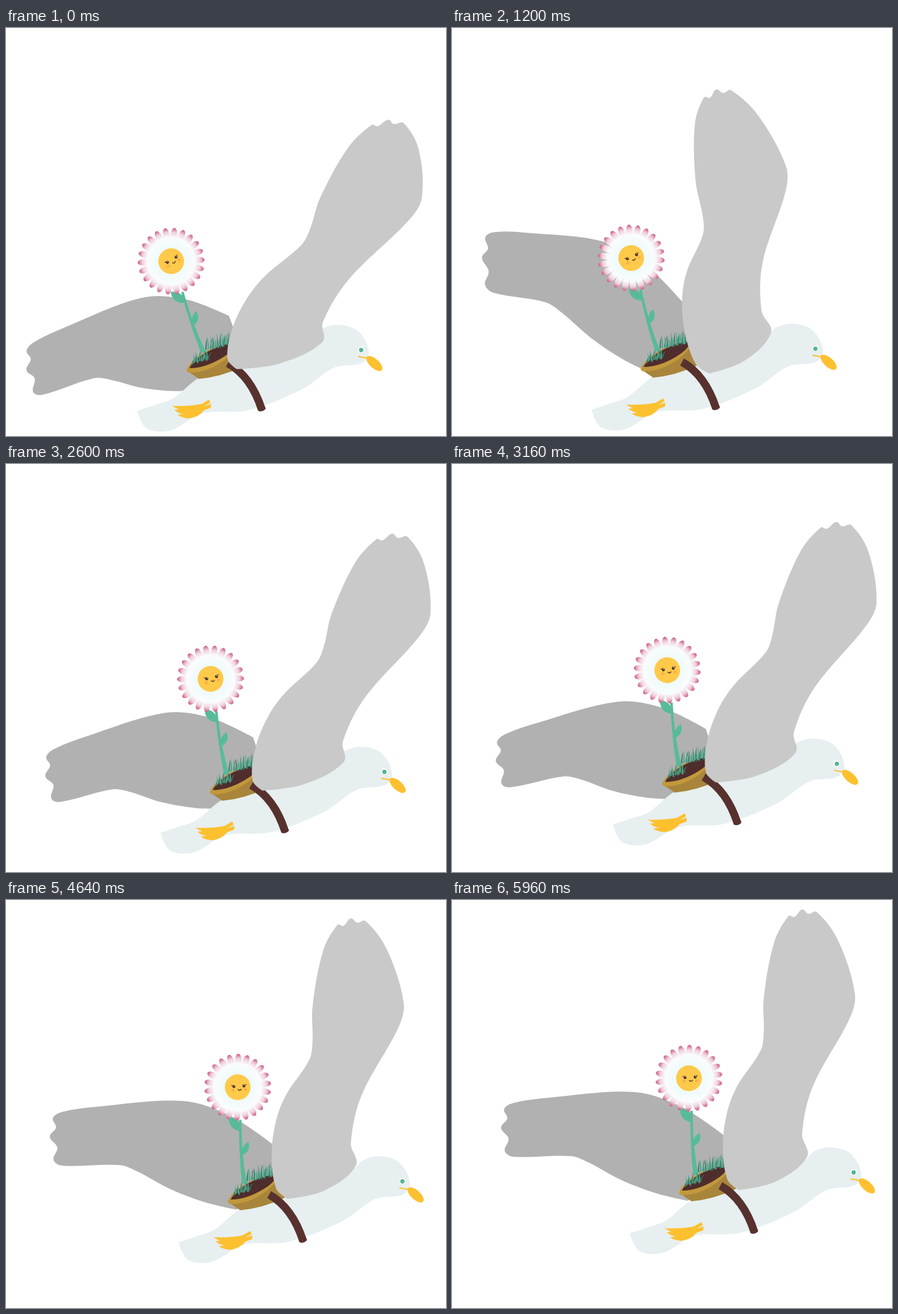
Write an HTML page with a canvas that moves like this. It is 700x650 px and loops after 6000 ms.

```html
<!DOCTYPE html>
<html lang="en">
<head>
<meta charset="utf-8">
<title>Gull and daisy</title>
<style>
html, body { margin: 0; width: 100%; height: 100%; overflow: hidden; background: #fff; }
canvas { display: block; position: absolute; left: 0; top: 0; }
</style>
</head>
<body>
<canvas id="stage" width="700" height="650"></canvas>
<script>
const ctx = document.getElementById('stage').getContext('2d');
const LOOP = 6000, STEP = 40, RAD = Math.PI / 180;
const REST = [1, 0, 0, 1, 0, 0];

// Each wing is one outline; raising and lowering it is an affine map about the shoulder.
const frontWing = {
  color: '#c9c9c9', shoulder: [430, 510], corners: [20],
  up: [1, -.12, .2, .985, 8, 6], down: [1.1, .05, -.29, .9, -1, 8],
  outline: [364,524, 357,470, 364,416, 380,375, 417,319, 422,290, 422,235, 439,145,
    462,104, 471,106, 483,94, 493,101, 506,98, 540,143, 567,228, 559,267, 500,376,
    483,452, 491,488, 440,528, 382,541]
};
const backWing = {
  color: '#b1b1b1', shoulder: [370, 500], corners: [0, 1, 16],
  up: [.92, .18, -.02, 1.12, 0, 0], down: [.9, -.278, .14, .98, 0, 0],
  outline: [380,540, 360,455, 290,408, 216,385, 80,394, 25,402, 9,412, 14,427, 4,442,
    16,459, 10,479, 24,488, 115,487, 143,497, 195,525, 250,546, 300,558]
};
const body = [209,610, 236,601, 266,590, 308,557, 400,522, 486,494, 503,479, 528,473,
  560,483, 577,516, 566,534, 522,541, 470,576, 385,609, 312,614, 262,641, 224,638];

// Time keys: [ms, value]
const moveX = [[0, 0], [1960, 26], [3760, 56], [6000, 74]];
const moveY = [[0, 0], [1200, -2], [2600, -22.5], [3760, -49], [6000, -79]];
const sway = [[0, 0], [1960, .46], [3760, .93], [4640, 1]];
const flap = [[0, 2], [640, 1.25], [1250, -.03], [1960, .82], [2600, 1.755], [2900, 1.97],
  [3200, 1.6], [3760, 1.16], [4640, 1]];
const tuck = [[0, .45], [1960, .45], [2600, 0]];

function rate(keys, i) {
  return (keys[i + 1][1] - keys[i][1]) / (keys[i + 1][0] - keys[i][0]);
}

function slope(keys, i) {
  if (i === 0 || i === keys.length - 1) return 0;
  const a = rate(keys, i - 1), b = rate(keys, i);
  return a * b > 0 ? 2 * a * b / (a + b) : 0;
}

// Monotone cubic between keys
function at(keys, t) {
  const last = keys.length - 1;
  if (t >= keys[last][0]) return keys[last][1];
  let i = 0;
  while (t >= keys[i + 1][0]) i++;
  const [t0, v0] = keys[i], [t1, v1] = keys[i + 1];
  const d = t1 - t0, u = (t - t0) / d, w = 1 - u;
  return v0 * (1 + 2 * u) * w * w + slope(keys, i) * d * u * w * w
    + v1 * u * u * (3 - 2 * u) - slope(keys, i + 1) * d * u * u * w;
}

const lerp = (a, b, u) => a + (b - a) * u;
const mix = (m, n, u) => m.map((v, i) => lerp(v, n[i], u));

// Smooth closed curve through x,y pairs
function blob(list, color, corners = []) {
  const n = list.length / 2;
  const pt = i => [list[(i + n) % n * 2], list[(i + n) % n * 2 + 1]];
  const dir = i => {
    if (corners.includes(i % n)) return [0, 0];
    const [ax, ay] = pt(i - 1), [bx, by] = pt(i + 1);
    const len = Math.hypot(bx - ax, by - ay);
    return [(bx - ax) / len, (by - ay) / len];
  };
  ctx.beginPath();
  ctx.moveTo(...pt(0));
  for (let i = 0; i < n; i++) {
    const [ax, ay] = pt(i), [bx, by] = pt(i + 1);
    const h = Math.hypot(bx - ax, by - ay) / 3;
    const [ux, uy] = dir(i), [vx, vy] = dir(i + 1);
    ctx.bezierCurveTo(ax + ux * h, ay + uy * h, bx - vx * h, by - vy * h, bx, by);
  }
  ctx.fillStyle = color;
  ctx.fill();
}

// lift: 0 raised, 1 level, 2 lowered; fold draws the wing in while it beats
function wing(part, lift, fold) {
  const { up, down, shoulder: [x, y] } = part;
  const pose = lift < 1 ? mix(up, REST, lift) : mix(REST, down, lift - 1);
  ctx.save();
  ctx.translate(x, y);
  ctx.transform(...mix(pose, mix(up, down, lift / 2), fold));
  ctx.translate(-x, -y);
  blob(part.outline, part.color, part.corners);
  ctx.restore();
}

function shape(path, color) {
  ctx.fillStyle = color;
  ctx.fill(new Path2D(path));
}

function line(path, color, width, cap = 'round') {
  ctx.strokeStyle = color;
  ctx.lineWidth = width;
  ctx.lineCap = cap;
  ctx.stroke(new Path2D(path));
}

function oval(x, y, rx, ry, color, turn = 0) {
  ctx.beginPath();
  ctx.ellipse(x, y, rx, ry, turn * RAD, 0, 2 * Math.PI);
  ctx.fillStyle = color;
  ctx.fill();
}

const dot = (x, y, r, color) => oval(x, y, r, r, color);

function gull() {
  const yellow = '#fdc02f';
  blob(body, '#e7eff0', [0]);
  line('M561 523.500L576 526', yellow, 2);
  oval(586, 534.5, 16, 7.3, yellow, 42);
  dot(565, 512.5, 4.8, '#fff');
  dot(565, 513, 3.4, '#55b394');
  shape('M264 602Q290 603 311 599L323 592L325 597L314 603L326 599L326 605L315 609Q307 620 291 622Q278 621 273 616L282 615Q271 613 268 608L275 608Z', yellow);
}

function tuft(count, x0, y0, x1, y1, height, seed) {
  const rnd = () => (seed = seed * 16807 % 2147483647) / 2147483647;
  for (let i = 0; i < count; i++) {
    const u = (i + rnd()) / count, x = lerp(x0, x1, u), y = lerp(y0, y1, u) + rnd() * 4 - 2;
    const tx = x + (rnd() - .45) * 11, ty = y - height * (.55 + .45 * rnd());
    shape(`M${x - 1} ${y}Q${x - .8} ${lerp(y, ty, .6)} ${tx} ${ty}Q${x + 1} ${lerp(y, ty, .5)} ${x + 1} ${y}Z`,
      i % 3 ? '#4fa98b' : '#37796a');
  }
}

function pot() {
  shape('M288 546L307 559Q342 556 378 539L367 503Z', '#a8853b');
  shape('M287 546C290 534 312 513 345 505Q360 501 368 503Q364 518 345 531Q318 550 290 549Z', '#c2983c');
  shape('M292 542C296 531 318 514 345 505Q360 501 366 503Q362 515 343 526Q316 542 292 542Z', '#4e2d2c');
}

function daisyHead() {
  const tint = ctx.createRadialGradient(0, 0, 18, 0, 0, 54);
  tint.addColorStop(0, '#eefafb');
  tint.addColorStop(.55, '#f9fcfd');
  tint.addColorStop(.78, '#f0cfdc');
  tint.addColorStop(1, '#c64a7a');
  const petal = new Path2D('M-2.500 -14C-3.500 -28 -7 -40 -4.500 -48C-2.500 -55 2.500 -55 4.500 -48C7 -40 3.500 -28 2.500 -14Z');
  const count = 22;
  dot(0, 0, 34, '#f1fafb');
  for (let i = 0; i < count; i++) {
    ctx.save();
    ctx.rotate((i + .25) * 2 * Math.PI / count);
    ctx.fillStyle = tint;
    ctx.fill(petal);
    ctx.restore();
  }
  dot(0, 0, 20.5, '#ffc94a');
  for (const [x, side] of [[-6, -1], [10, 1]]) {
    dot(x + side * 2, 4.5, 2.4, '#f9b04a');
    dot(x, -1.5, 2.4, '#4a2b2b');
    line(`M${x} -3L${x + side * 4} -3.500`, '#4a2b2b', .9);
    dot(x + .7, -2.4, .7, '#fff');
  }
  line('M0.500 3.500Q3 6.500 5.500 3.500', '#4a2b2b', 1.3);
}

function daisy(s) {
  const green = '#58bb97', lean = 1 - s;
  ctx.save();
  ctx.translate(314, 515);
  ctx.rotate(-15.5 * lean * RAD);
  shape('M-4 2Q-9 -40 -9 -100L-5 -100Q-5 -40 4 2Z', green);
  shape('M-6 -43C-5 -56 0 -62 6 -65C9 -55 6 -47 -6 -43Z', green);
  shape('M-7 -82C-20 -84 -26 -92 -25 -105C-13 -103 -6 -96 -7 -82Z', green);
  ctx.translate(-11, -152);
  ctx.rotate((-3 - 12.5 * lean) * RAD);
  daisyHead();
  ctx.restore();
}

function draw(t) {
  const lift = at(flap, t);
  ctx.fillStyle = '#fff';
  ctx.fillRect(0, 0, 700, 650);
  ctx.save();
  ctx.translate(at(moveX, t), at(moveY, t));
  wing(backWing, lift, at(tuck, t));
  gull();
  pot();
  tuft(24, 318, 513, 363, 503, 24, 71);
  daisy(at(sway, t));
  tuft(16, 297, 535, 323, 527, 18, 29);
  line('M353 534Q390 555 407 608', '#57312e', 12.5, 'butt');
  oval(407, 607, 6.2, 3.5, '#57312e', -17);
  wing(frontWing, lift, 0);
  ctx.restore();
}

const start = performance.now();
function tick(now) {
  const t = Math.max(0, now - start) % LOOP;
  draw(Math.floor(t / STEP) * STEP);
  requestAnimationFrame(tick);
}
draw(0);
requestAnimationFrame(tick);
</script>
</body>
</html>
```
